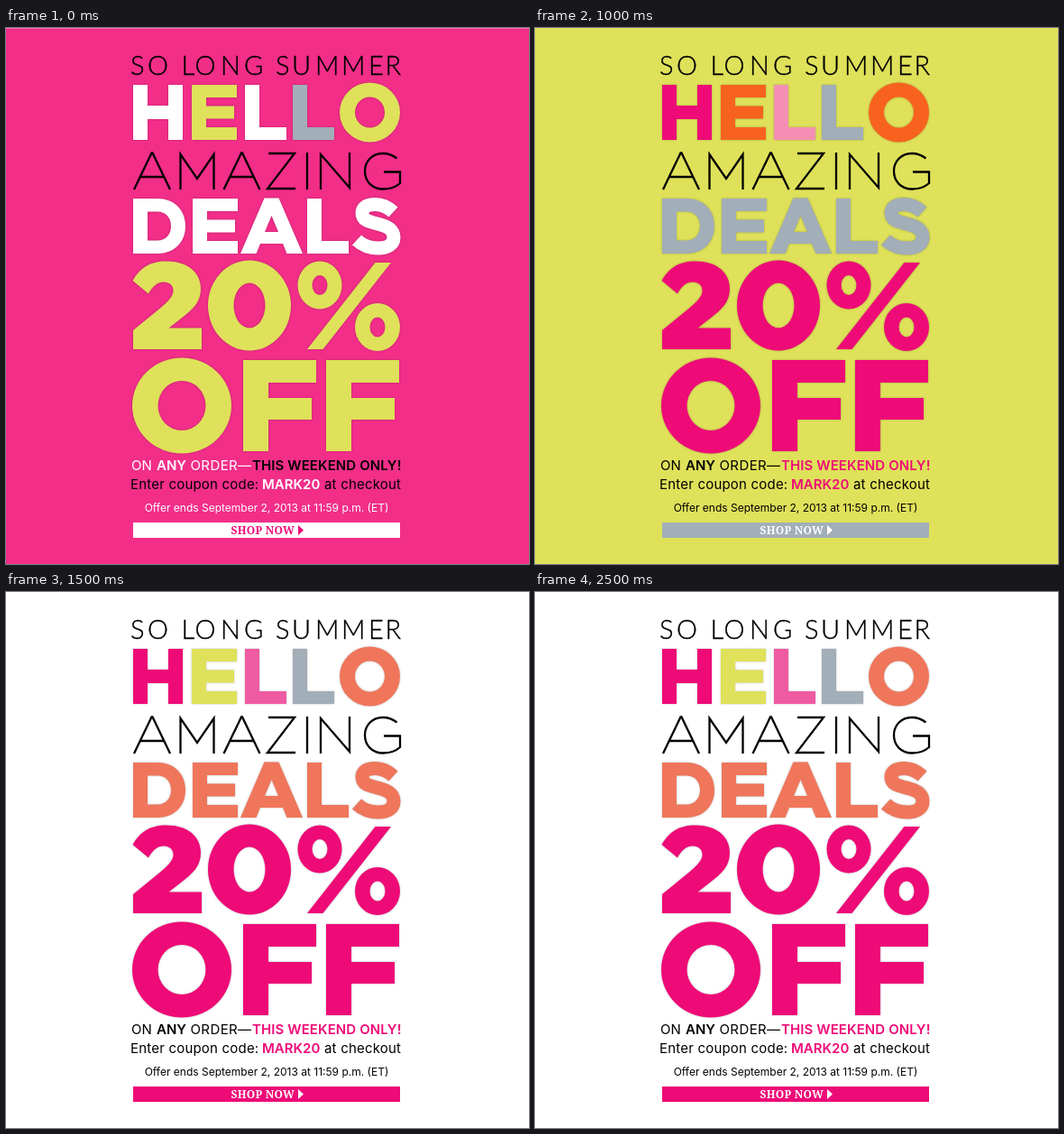
Write an HTML page that moves like this. It is 580 px wide and 594 px high and loops after 3 s.

```html
<!DOCTYPE html>
<html lang="en">
<head>
<meta charset="utf-8">
<title>Weekend sale</title>
<style>
html, body { margin: 0; width: 100%; height: 100%; overflow: hidden; }
svg {
  display: block;
  width: 580px;
  height: 594px;
  background: var(--bg);
  animation: theme 3s step-end infinite;
}

/* Hard colour swaps: pink, white, lime, white, pink, white */
@keyframes theme {
  0%, 66.666%, 100% {
    --bg: #f22e89; --h: #fff; --e: #dfe15a; --l1: #fff; --l2: #a2aeb8; --o: #dfe15a;
    --deals: #fff; --off: #dfe15a; --note: #fff; --strong: #fff; --when: #000;
    --code: #fff; --bar: #fff; --cta: #ee0a77; --edge: .25;
  }
  16.666%, 50%, 83.333% {
    --bg: #fff; --h: #ee0a77; --e: #dfe15a; --l1: #ee5ba3; --l2: #a2aeb8; --o: #ef765b;
    --deals: #ef765b; --off: #ee0a77; --note: #000; --strong: #000; --when: #ee0a77;
    --code: #ee0a77; --bar: #ee0a77; --cta: #fff; --edge: 0;
  }
  33.333% {
    --bg: #dfe15a; --h: #ee0a77; --e: #f7631f; --l1: #f48fb3; --l2: #a2aeb8; --o: #f7631f;
    --deals: #a2aeb8; --off: #ee0a77; --note: #000; --strong: #000; --when: #ee0a77;
    --code: #ee0a77; --bar: #a2aeb8; --cta: #fff; --edge: 0;
  }
}

.heavy { fill-rule: evenodd; filter: drop-shadow(0 .5px .8px rgba(0, 0, 0, .25)); }
.deals { fill: var(--deals); }
.off { fill: var(--off); }
.curve { fill: none; stroke: var(--deals); stroke-width: 15; }
.thin { fill: none; stroke: #000; stroke-width: 2.3; }
.intro { font: 300 29px Lato, sans-serif; stroke: #000; stroke-width: .35px; }
.body { font: 400 15px Inter, sans-serif; }
.small { font: 400 12px Inter, sans-serif; text-anchor: middle; }
.bold { font-weight: 600; }
.note { fill: var(--note); }
.strong { fill: var(--strong); }
.when { fill: var(--when); }
.code { fill: var(--code); }
.cta { font: 700 12px "Noto Serif", serif; letter-spacing: .25px; fill: var(--cta); }
</style>
</head>
<body>
<svg viewBox="0 0 580 594">
  <defs>
    <path id="E" d="M0 0h50v14h-34v9.5h31v14h-31v9.5h34v14h-50z"/>
    <path id="L" d="M0 0h16v47h30v14h-46z"/>
  </defs>
  <rect width="580" height="1" fill="#fff" style="opacity: var(--edge)"/>

  <text class="intro" y="52" x="138 157 183 194.5 209.5 238 264 290 299 317 343 372 402 420.5">SO LONG SUMMER</text>

  <g class="heavy" role="img" aria-label="HELLO">
    <path style="fill: var(--h)" d="M141 63h16v23h23v-23h16v61h-16v-23h-23v23h-16z"/>
    <use href="#E" x="206" y="63" style="fill: var(--e)"/>
    <use href="#L" x="265" y="63" style="fill: var(--l1)"/>
    <use href="#L" x="318" y="63" style="fill: var(--l2)"/>
    <path style="fill: var(--o)" d="M370 93.5a33.5 33 0 1 1 67 0a33.5 33 0 1 1-67 0zm17 0a16.5 17 0 1 1 33 0a16.5 17 0 1 1-33 0z"/>
  </g>

  <g class="thin" role="img" aria-label="AMAZING">
    <path id="A" d="M142 179L161.5 138.5h1L182 179M149 165h26"/>
    <path d="M193.5 179V140L212 167L230.5 140V179"/>
    <use href="#A" x="99.5"/>
    <path d="M291 139h29L290 178h31"/>
    <path d="M334 138v41M349 179V140L381 177V138"/>
    <path d="M433.5 144.5C429 141 425 139 418 139C406 139 398 148 398 158.5C398 170 406 178.5 418.5 178.5C426 178.5 432.5 176 437 172V159.5H419"/>
  </g>

  <g class="heavy deals" role="img" aria-label="DEALS">
    <path d="M141 189h27c18 0 31 12 31 30.5s-13 30.5-31 30.5h-27zM157 203.5v32h11c9 0 15-6.5 15-16s-6-16-15-16z"/>
    <use href="#E" x="207" y="189"/>
    <path d="M286.5 188.5h16l26.5 61.5h-17.5l-4.5-11h-25l-4.5 11h-17.5zM294.5 208l7.5 18h-15z"/>
    <use href="#L" x="334" y="189"/>
    <path class="curve" d="M429.5 204C424 199 417 195.5 409.5 195.5C400 195.5 395 199 395 205C395 213 402 214.5 412 217C423 220 430 223 430 232C430 240 423 244 412.5 244C403 244 395 240.5 389 235"/>
  </g>

  <g class="heavy off" role="img" aria-label="20% OFF">
    <path d="M141 335L171 310.5C181 302 185.5 297 185.5 291C185.5 285 181 281.5 175 281.5C168 281.5 163 285.5 158 294.5L140.5 280C149 266 159 258.5 178 258.5C201 258.5 216 270.5 216 289C216 304 207 312 194 322L180.5 332.5H217V356H141z"/>
    <path d="M224 307.5a46 50 0 1 1 92 0a46 50 0 1 1-92 0zm28.5 0a17.5 25 0 1 1 35 0a17.5 25 0 1 1-35 0z"/>
    <path d="M323.5 285a24.5 26.5 0 1 1 49 0a24.5 26.5 0 1 1-49 0zm16 0a8.5 11 0 1 1 17 0a8.5 11 0 1 1-17 0z"/>
    <path d="M409.5 260h17.5L351.5 356h-17.5z"/>
    <path d="M387 331.5a25 26.5 0 1 1 50 0a25 26.5 0 1 1-50 0zm16.5 0a8.5 11 0 1 1 17 0a8.5 11 0 1 1-17 0z"/>
    <path d="M140 418.5a55 53 0 1 1 110 0a55 53 0 1 1-110 0zm28.5 0a26.5 27.5 0 1 1 53 0a26.5 27.5 0 1 1-53 0z"/>
    <path id="F" d="M263 368h81v25h-53v17h48v24h-48v35h-28z"/>
    <use href="#F" x="92"/>
  </g>

  <text class="body" y="490">
    <tspan class="note" x="139">ON</tspan>
    <tspan class="strong bold" x="167">ANY</tspan>
    <tspan class="note" x="204.5" letter-spacing=".4">ORDER—</tspan>
    <tspan class="when bold" x="273" letter-spacing=".1">THIS WEEKEND ONLY!</tspan>
  </text>
  <text class="body" y="511">
    <tspan x="138" letter-spacing=".2">Enter coupon code:</tspan>
    <tspan class="code bold" x="284">MARK20</tspan>
    <tspan x="353" letter-spacing=".2">at checkout</tspan>
  </text>
  <text class="small note" x="289" y="536">Offer ends September 2, 2013 at 11:59 p.m. (ET)</text>

  <rect x="141" y="548" width="296" height="17" style="fill: var(--bar)"/>
  <text class="cta" x="249.5" y="561">SHOP NOW</text>
  <path d="M324 551l6 5.5l-6 5.5z" style="fill: var(--cta)"/>
</svg>
</body>
</html>
```
